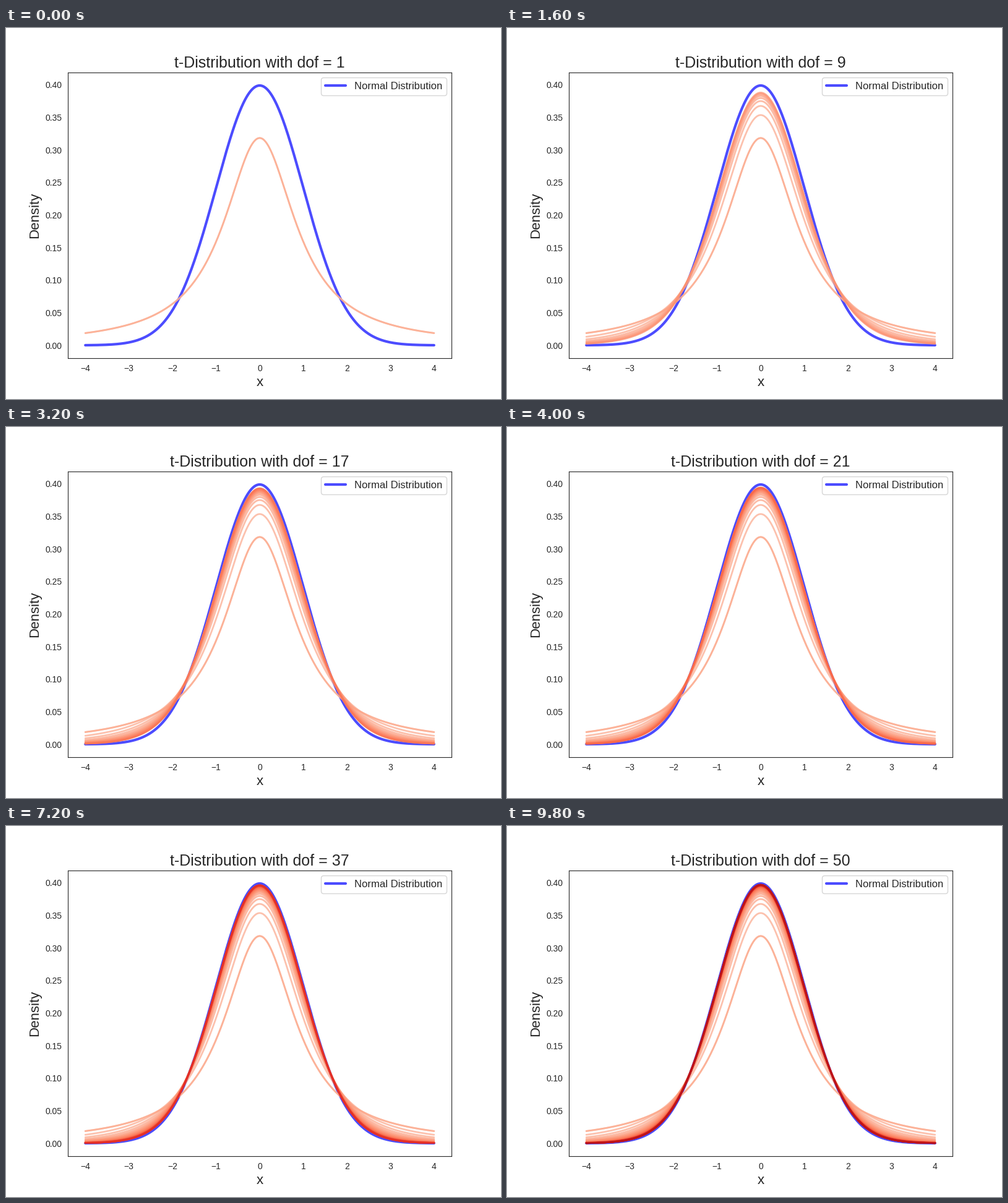
Recreate the animation shown at these times as a matplotlib script. Size 800 by 600 pixels, loop 10 s.

```python
import math

import matplotlib.pyplot as plt
import numpy as np
from matplotlib.animation import FuncAnimation

N_DOF = 50
STEP_MS = 200
INK = "0.15"

plt.rcParams.update({
    "font.family": "Liberation Sans",
    "text.color": INK,
    "axes.labelcolor": INK,
    "axes.edgecolor": INK,
    "xtick.color": INK,
    "ytick.color": INK,
    "xtick.bottom": False,
    "ytick.left": False,
    "lines.solid_capstyle": "round",
})


def normal_pdf(x):
    return np.exp(-x**2 / 2) / math.sqrt(2 * math.pi)


def t_pdf(x, dof):
    log_c = math.lgamma((dof + 1) / 2) - math.lgamma(dof / 2)
    scale = math.exp(log_c) / math.sqrt(dof * math.pi)
    return scale * (1 + x**2 / dof) ** (-(dof + 1) / 2)


fig, ax = plt.subplots(figsize=(8, 6), dpi=100)
x = np.linspace(-4, 4, 500)

ax.plot(x, normal_pdf(x), color="blue", lw=3, alpha=0.7,
        label="Normal Distribution")
ax.set_xlabel("x", fontsize=16)
ax.set_ylabel("Density", fontsize=16)
ax.legend(loc="upper right", fontsize=12)
title = ax.set_title("", fontsize=18)

colors = plt.cm.Reds(np.linspace(0.3, 0.8, N_DOF))


def add_curve(dof):
    line, = ax.plot(x, t_pdf(x, dof), color=colors[dof - 1], lw=2, alpha=0.7)
    return line


# The first curve is laid down twice, so it looks denser than the next ones.
add_curve(1)
curves = [add_curve(dof) for dof in range(1, N_DOF + 1)]


def update(i):
    for k, line in enumerate(curves):
        line.set_visible(k <= i)
    title.set_text(f"t-Distribution with dof = {i + 1}")
    return [*curves, title]


anim = FuncAnimation(fig, update, frames=N_DOF, interval=STEP_MS,
                     repeat=True, repeat_delay=0)
plt.show()
```
